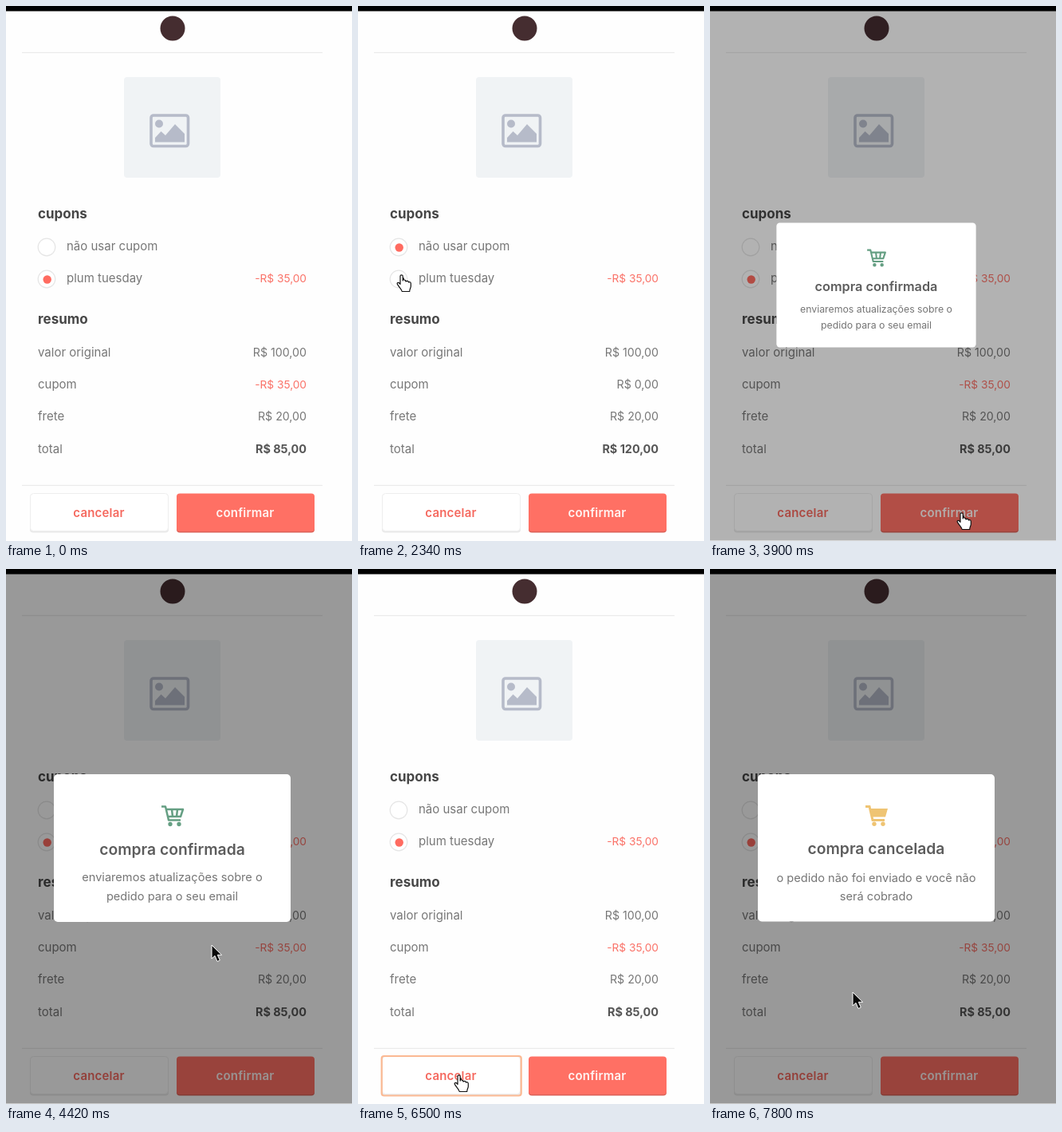
Recreate the animation shown at these times as an HTML page. Size 434 px wide and 670 px high, loop 8000 ms.

```html
<!DOCTYPE html>
<html lang="pt-BR">
<head>
<meta charset="utf-8">
<title>Resumo da compra</title>
<style>
  html, body { margin: 0; width: 100%; height: 100%; overflow: hidden; background: #fefefe; }
  svg { display: block; width: 434px; height: 670px; }
  text { font: 15px Inter, "Open Sans", sans-serif; fill: #777; }
  .head { font-size: 17px; font-weight: 700; fill: #464646; }
  .price { font-size: 14.2px; text-anchor: end; }
  .off { font-size: 13.7px; fill: #fa7268; }
  .sum { font-size: 14.4px; font-weight: 700; fill: #565656; }
  .btn { font-weight: 600; letter-spacing: .2px; text-anchor: middle; }
  .title { font-size: 19.3px; font-weight: 600; fill: #5c5c5c; text-anchor: middle; }
  .note { font-size: 14.6px; fill: #757575; text-anchor: middle; }
  .radio { fill: #fff; stroke: #e5e5e5; stroke-width: 1.2; }
  .dot { fill: #ff6b60; }
</style>
</head>
<body>
<svg viewBox="0 0 434 670">
  <rect width="434" height="670" fill="#fefefe"/>
  <circle cx="209" cy="28" r="15.5" fill="#452d30"/>
  <path d="M20 58.3H397M20 600.3H397" stroke="#ebebeb" stroke-width="1.3"/>

  <rect x="148" y="89" width="121" height="126" rx="4" fill="#f0f3f5"/>
  <g fill="#b6bbc9">
    <rect x="182" y="137" width="46.5" height="38.5" rx="3" fill="none" stroke="#b6bbc9" stroke-width="3.6"/>
    <circle cx="192" cy="147.5" r="5"/>
    <path d="M187 170.5V165L194.5 157L200 162L212 148L224 160V170.5Z"/>
  </g>

  <text class="head" x="40" y="266">cupons</text>
  <circle class="radio" cx="51" cy="302" r="10.8"/>
  <circle class="radio" cx="51" cy="342" r="10.8"/>
  <circle class="dot" id="dot" cx="51.7" r="5.2"/>
  <text x="76" y="306">não usar cupom</text>
  <text x="76" y="346">plum tuesday</text>
  <text class="price off" x="377" y="346">-R$ 35,00</text>

  <text class="head" x="40" y="398">resumo</text>
  <text x="40" y="439">valor original</text>
  <text x="40" y="479">cupom</text>
  <text x="40" y="519">frete</text>
  <text x="40" y="560">total</text>
  <text class="price" x="377" y="439">R$ 100,00</text>
  <text class="price" id="discount" x="377" y="479"></text>
  <text class="price" x="377" y="519">R$ 20,00</text>
  <text class="price sum" id="total" x="377" y="560"></text>

  <rect x="30" y="612" width="174" height="47.5" rx="4" fill="#e9e9e9"/>
  <rect x="30.5" y="610.5" width="173" height="47" rx="4" fill="#fff" stroke="#eee"/>
  <rect id="ring" x="29.7" y="610" width="175" height="49.5" rx="3" fill="none" stroke="#fbb993" stroke-width="2.2"/>
  <text class="btn" x="116.5" y="639.5" style="fill:#f5695f">cancelar</text>
  <rect x="214" y="612" width="173" height="47.5" rx="4" fill="#db6057"/>
  <rect x="214" y="610.5" width="173" height="47.5" rx="4" fill="#ff7064"/>
  <text class="btn" x="300" y="639.5" style="fill:#fff4f2">confirmar</text>

  <rect id="shade" y="6" width="434" height="663.5"/>
  <g id="done">
    <rect x="60" y="257" width="297" height="185" rx="5" fill="#fff"/>
    <g transform="translate(195 296)" fill="none" stroke="#659f83" stroke-width="2.5" stroke-linejoin="round">
      <path d="M0 1.5H5L9 18.5H24M6 5H27L24 14H8M13 5L14 14M20 5L19 14"/>
      <circle cx="11" cy="23.5" r="1.4"/><circle cx="22" cy="23.5" r="1.4"/>
    </g>
    <text class="title" x="208.5" y="358">compra confirmada</text>
    <text class="note" x="208.5" y="391">enviaremos atualizações sobre o</text>
    <text class="note" x="208.5" y="414.5">pedido para o seu email</text>
  </g>
  <g id="undone">
    <rect x="60" y="257" width="297" height="184.5" rx="5" fill="#fff"/>
    <g transform="translate(195 296)" fill="#efc473">
      <path d="M0 1.5H5L9 18.5H24" fill="none" stroke="#efc473" stroke-width="3"/>
      <path d="M6 4H28L25 14.5H8.5Z"/>
      <circle cx="11" cy="23.3" r="2.7"/><circle cx="22" cy="23.3" r="2.7"/>
    </g>
    <text class="title" x="208.5" y="357">compra cancelada</text>
    <text class="note" x="208.5" y="391.5">o pedido não foi enviado e você não</text>
    <text class="note" x="208.5" y="415">será cobrado</text>
  </g>

  <g id="cursor">
    <path id="arrow" d="M0 0V17L4 13.4L7 20.5L10.3 19L7.3 12.3H12.6Z" fill="#080808" stroke="#fff" stroke-width="1"/>
    <path id="hand" d="M-2 1.2C-2-.6 1.2-.6 1.2 1.2V7C2-.0 2 6 3.2 6.2C4.6 6.2 5 7 5 8C6.2 6.8 8.3 7.4 8.3 9C9.8 8 11.3 9 11.3 10.5V14C11.3 16 9.7 17.5 9.7 20.5H.2C-.3 17.8-3 16-5.6 11.4C-6.6 9.5-4.4 8.6-3.2 10L-2 11.4Z" fill="#fff" stroke="#111" stroke-width="1.2" stroke-linejoin="round"/>
  </g>
  <rect width="434" height="6.5"/>
</svg>
<script>
const LOOP = 8000, STEP = 130;
const $ = id => document.getElementById(id);
const show = (id, on) => $(id).setAttribute('visibility', on ? 'visible' : 'hidden');
const clamp = v => Math.max(0, Math.min(1, v));
const smooth = u => u * u * (3 - 2 * u);

// time, x, y of the pointer's hot spot
const path = [
  [200, 440, 420], [910, 58, 313], [1170, 50, 301], [1950, 50, 301],
  [2340, 55, 337], [2990, 55, 337], [3770, 316, 635], [3900, 316, 635],
  [4420, 258, 471], [5590, 258, 471], [6370, 127, 634], [6890, 127, 634],
  [7800, 179, 530]
];
const pop = [[0, .7], [135, 1.05], [240, .95], [300, 1]];
const dialogs = [
  { id: 'done', open: 3845, close: 5455 },
  { id: 'undone', open: 6570, close: Infinity }
];

// Interpolates rows of [time, ...values]
function at(rows, t, ease = u => u) {
  const i = rows.findIndex(r => r[0] > t);
  if (i < 0) return rows[rows.length - 1].slice(1);
  if (i === 0) return rows[0].slice(1);
  const a = rows[i - 1], b = rows[i];
  const u = ease((t - a[0]) / (b[0] - a[0]));
  return a.slice(1).map((v, k) => v + (b[k + 1] - v) * u);
}

const inside = (x, y, l, t, r, b) => x >= l && x <= r && y >= t && y <= b;
const clickable = (x, y) =>
  inside(x, y, 40, 291, 190, 312) || inside(x, y, 40, 331, 160, 353) ||
  inside(x, y, 31, 611, 203, 659) || inside(x, y, 214, 611, 387, 659);

function drawDialog({ id, open, close }, t) {
  const hide = clamp((t - close) / 150);
  const scale = at(pop, t - open)[0] * (1 - hide / 2);
  show(id, t >= open && hide < 1);
  $(id).setAttribute('opacity', 1 - hide);
  $(id).setAttribute('transform', `translate(208.5 349.3) scale(${scale}) translate(-208.5 -349.3)`);
  return clamp((t - open) / 73) * (1 - clamp((t - close - 140) / 100));
}

function draw(time) {
  const t = Math.floor(time / STEP) * STEP;
  const coupon = t < 1560 || t >= 2600;
  $('dot').setAttribute('cy', coupon ? 342.5 : 302.5);
  $('discount').textContent = coupon ? '-R$ 35,00' : 'R$ 0,00';
  $('discount').classList.toggle('off', coupon);
  $('total').textContent = coupon ? 'R$ 85,00' : 'R$ 120,00';
  show('ring', t >= 6400 && t < 6570);

  const dim = Math.max(...dialogs.map(d => drawDialog(d, t)));
  $('shade').setAttribute('opacity', dim * .4);

  const [x, y] = at(path, t, smooth);
  const hand = dim < .95 && clickable(x, y);
  $('cursor').setAttribute('transform', `translate(${x} ${y})`);
  show('arrow', t >= 260 && !hand);
  show('hand', t >= 260 && hand);
}

const start = performance.now();
function tick() {
  draw((performance.now() - start) % LOOP);
  requestAnimationFrame(tick);
}
draw(0);
tick();
</script>
</body>
</html>
```
